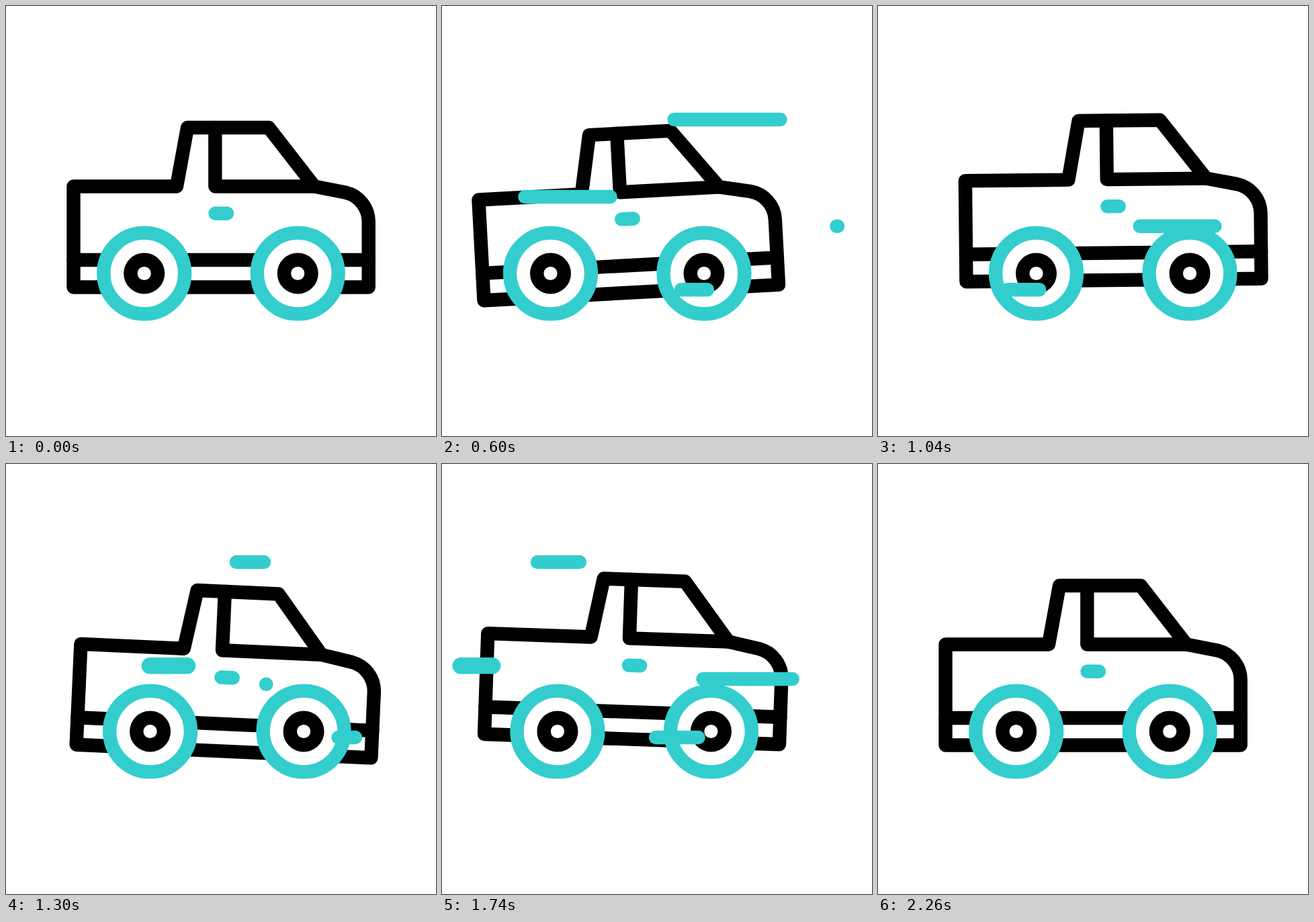
An HTML page for the animation above (2.42 s loop, 640 by 640 pixels).

```html
<!DOCTYPE html>
<html lang="en">
<head>
<meta charset="utf-8">
<title>Pickup</title>
<style>
  html, body { margin: 0; height: 100%; overflow: hidden; background: #fff; }
  svg { display: block; width: 100vw; height: 100vh; }
  g { fill: none; stroke: #000; stroke-width: 20.4; stroke-linecap: round; stroke-linejoin: round; }
  .teal { stroke: #33cdcd; }
</style>
</head>
<body>
<svg viewBox="0 0 640 640">
  <defs>
    <g id="wheel">
      <circle class="teal" r="60.4" fill="#fff"/>
      <circle r="20.3"/>
    </g>
  </defs>
  <g id="body">
    <path d="M100.5 268.5H254L270 181H391L459 268.5L505 277.5C525 282 539.7 300 539.7 321V418.5H100.5Z"/>
    <path d="M311.3 181V268.5H459M100.5 378H539.7"/>
    <path class="teal" d="M311.5 308.7H329"/>
  </g>
  <g id="wheels">
    <use href="#wheel" x="205.7" y="398"/>
    <use href="#wheel" x="434.2" y="398"/>
  </g>
  <g id="streaks" class="teal"></g>
</svg>
<script>
const LOOP = 2420;
const TRIM = 500; // time for one end of a streak to cross its track
const LAG = 238;  // delay of the tail behind the head

const $ = id => document.getElementById(id);
const ease = p => {
  p = Math.min(1, Math.max(0, p));
  return p * p * (3 - 2 * p);
};

// Eases from rest through evenly spaced peaks and back to rest.
function swing(t, start, step, ...peaks) {
  let value = 0;
  [...peaks, 0].forEach((peak, i) => {
    value += (peak - value) * ease((t - start) / step - i);
  });
  return value;
}

// A line that grows leftwards from x and then shrinks towards its left end.
function addStreak(start, x, y, size = 1) {
  const track = (y < 200 ? 242 : 202) * size; // longer above the roof
  const path = document.createElementNS("http://www.w3.org/2000/svg", "path");
  path.style.strokeWidth = 20.4 * size;
  $("streaks").append(path);
  return t => {
    const age = t - start;
    const head = x - track * ease(age / TRIM);
    const tail = x - track * ease((age - LAG) / TRIM);
    path.setAttribute("d", head < tail ? `M${tail} ${y}H${head}` : "");
  };
}

const streaks = [
  addStreak(258, 531, 169),
  addStreak(283, 264.5, 284),
  addStreak(460, 395, 422.3),
  addStreak(575, 589, 327.7),
  addStreak(1145, 270, 300.3, 1.2),
  addStreak(1170, 384, 146),
  addStreak(1190, 520, 407),
  addStreak(1368, 558, 320)
];

function draw(t) {
  const shift = swing(t, 25, 535, -45.5, 32, -38);
  const lift = swing(t, 48, 438, 13, -15, 10.5, -9.8);
  const tilt = swing(t, 0, 720, -3.3, 3.2);
  $("wheels").setAttribute("transform", `translate(${shift})`);
  $("body").setAttribute("transform", `translate(${shift} ${lift}) rotate(${tilt} 320 309)`);
  streaks.forEach(update => update(t));
}

const begin = performance.now();
function tick() {
  draw((performance.now() - begin) % LOOP);
  requestAnimationFrame(tick);
}
tick();
</script>
</body>
</html>
```
